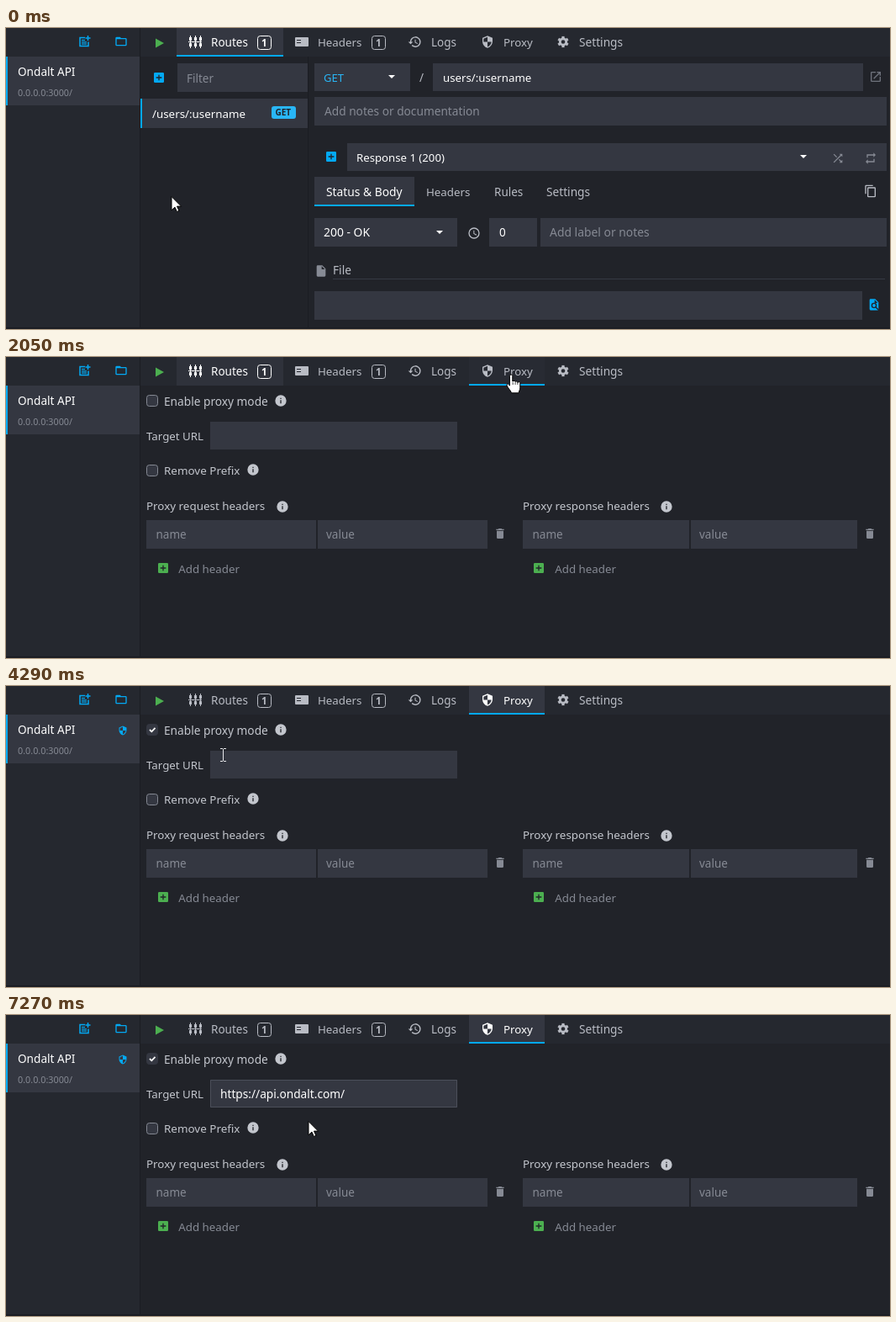
An HTML page with a canvas for the animation above (7370 ms loop, 1052x358 px).

```html
<!DOCTYPE html>
<html lang="en">
<head>
<meta charset="utf-8">
<title>Proxy mode setup</title>
<style>
  html, body { margin: 0; width: 100%; height: 100%; overflow: hidden; background: #212329; }
  canvas { display: block; width: 1052px; height: 358px; }
</style>
</head>
<body>
<canvas id="stage"></canvas>
<script>
const W = 1052, H = 358, LOOP = 7370;
const canvas = document.getElementById('stage');
const ctx = canvas.getContext('2d');
const dpr = window.devicePixelRatio || 1;
canvas.width = W * dpr;
canvas.height = H * dpr;

const C = {
  page: '#212329', side: '#25282f', field: '#343741', edge: '#1b1d23',
  blue: '#03a9f4', green: '#4caf50', white: '#ffffff',
  text: '#b9bcc4', label: '#c3c6cd', hint: '#868a94', dim: '#6f737d'
};

// Icons on a 24 unit grid
const ICONS = {
  shield: 'M12 1L3 5v6c0 5.55 3.84 10.74 9 12 5.16-1.26 9-6.45 9-12V5zm0 10.99h7c-.53 4.12-3.28 7.79-7 8.94V12H5V6.3l7-3.11z',
  history: 'M13 3a9 9 0 0 0-9 9H1l4 4 4-4H6a7 7 0 1 1 2.06 4.94l-1.42 1.42A9 9 0 1 0 13 3zm-1 5v5l4.28 2.54.72-1.21-3.5-2.08V8z',
  trash: 'M6 19a2 2 0 0 0 2 2h8a2 2 0 0 0 2-2V7H6zM19 4h-3.5l-1-1h-5l-1 1H5v2h14z',
  info: 'M12 2a10 10 0 1 0 0 20a10 10 0 1 0 0-20zm1 15h-2v-6h2zm0-8h-2V7h2z',
  add: 'M19 3H5a2 2 0 0 0-2 2v14a2 2 0 0 0 2 2h14a2 2 0 0 0 2-2V5a2 2 0 0 0-2-2zm-2 10h-4v4h-2v-4H7v-2h4V7h2v4h4z',
  folder: 'M20 6h-8l-2-2H4a2 2 0 0 0-2 2v12a2 2 0 0 0 2 2h16a2 2 0 0 0 2-2V8a2 2 0 0 0-2-2zm0 12H4V8h16z',
  file: 'M6 2a2 2 0 0 0-2 2v16a2 2 0 0 0 2 2h12a2 2 0 0 0 2-2V8l-6-6zm7 7V3.5L18.5 9z',
  copy: 'M16 1H4a2 2 0 0 0-2 2v14h2V3h12zm3 4H8a2 2 0 0 0-2 2v14a2 2 0 0 0 2 2h11a2 2 0 0 0 2-2V7a2 2 0 0 0-2-2zm0 16H8V7h11z',
  repeat: 'M7 7h10v3l4-4-4-4v3H5v6h2zm10 10H7v-3l-4 4 4 4v-3h12v-6h-2z',
  shuffle: 'M10.6 9.2L5.4 4 4 5.4l5.2 5.2zM14.5 4l2 2L4 18.6 5.4 20 18 7.5l2 2V4zm.3 9.4l-1.4 1.4 3.1 3.1-2 2.1H20v-5.5l-2 2z',
  open: 'M19 19H5V5h7V3H5a2 2 0 0 0-2 2v14a2 2 0 0 0 2 2h14a2 2 0 0 0 2-2v-7h-2zM14 3v2h3.6l-9.8 9.8 1.4 1.4L19 6.4V10h2V3z',
  clock: 'M12 2a10 10 0 1 0 0 20a10 10 0 1 0 0-20zm0 2a8 8 0 1 1 0 16a8 8 0 1 1 0-16zM11 7v6l5 3 .8-1.3-4.3-2.5V7z'
};
for (const k in ICONS) ICONS[k] = new Path2D(ICONS[k]);

const ARROW = new Path2D('M0 .5V16.8l3.9-3.7 2.5 5.4 2.6-1.1-2.5-5.3h5z');
const HAND = new Path2D('M-1.6 1.6a1.7 1.7 0 0 1 3.4 0V8l1.1-.5a1.6 1.6 0 0 1 2.2 1 1.6 1.6 0 0 1 2.8 1A1.6 1.6 0 0 1 10.8 11v4.8c0 2.2-1.3 3.2-1.6 6H.5c-.4-2.4-3.4-4.7-5.4-8.8-.8-1.9 1.3-2.5 2.2-1.3l1.1 1.4z');

function rect(x, y, x2, y2, color) {
  ctx.fillStyle = color;
  ctx.fillRect(x, y, x2 - x, y2 - y);
}

function field(x, y, x2, y2) { rect(x, y, x2, y2, C.field); }

function text(str, x, y, color = C.text, size = 13.5, weight = 400) {
  ctx.font = `${weight} ${size}px "Noto Sans", "Open Sans", sans-serif`;
  ctx.fillStyle = color;
  ctx.fillText(str, x, y);
}

function icon(name, cx, cy, size, color) {
  ctx.save();
  ctx.translate(cx - size / 2, cy - size / 2);
  ctx.scale(size / 24, size / 24);
  ctx.fillStyle = color;
  ctx.fill(ICONS[name], 'evenodd');
  ctx.restore();
}

function line(color, width, ...pts) {
  ctx.beginPath();
  for (let i = 0; i < pts.length; i += 2) ctx.lineTo(pts[i], pts[i + 1]);
  ctx.strokeStyle = color;
  ctx.lineWidth = width;
  ctx.stroke();
}

function shape(color, ...pts) {
  ctx.beginPath();
  for (let i = 0; i < pts.length; i += 2) ctx.lineTo(pts[i], pts[i + 1]);
  ctx.fillStyle = color;
  ctx.fill();
}

function box(x, y, w, h, r, stroke, fill) {
  ctx.beginPath();
  ctx.roundRect(x, y, w, h, r);
  if (fill) { ctx.fillStyle = fill; ctx.fill(); }
  if (stroke) { ctx.strokeStyle = stroke; ctx.lineWidth = 1; ctx.stroke(); }
}

function dropdown(cx, cy) { shape(C.white, cx - 4, cy - 2, cx + 4, cy - 2, cx, cy + 2); }

function badge(x, color) {
  box(x + .5, 9.5, 16, 16, 3, color);
  text('1', x + 5, 22, color, 11.5, 700);
}

function gear(cx, cy, color) {
  ctx.strokeStyle = color;
  ctx.lineWidth = 2.8;
  ctx.beginPath();
  ctx.arc(cx, cy, 3.7, 0, 7);
  ctx.stroke();
  for (let i = 0; i < 6; i++) {
    const a = i * Math.PI / 3 + Math.PI / 6, c = Math.cos(a), s = Math.sin(a);
    line(color, 3.2, cx + c * 4, cy + s * 4, cx + c * 6.6, cy + s * 6.6);
  }
}

function sidebar(proxied) {
  rect(0, 0, 159, H, C.side);
  field(0, 34, 159, 92);
  rect(0, 34, 2, 92, C.blue);
  rect(159, 0, 160, H, C.edge);
  line(C.blue, 1.5, 94, 11.5, 88, 11.5, 88, 21.5, 98, 21.5, 98, 16.5);
  for (const y of [14.5, 16.8, 19]) line(C.blue, 1.2, 90, y, y < 15 ? 94 : 96, y);
  line(C.blue, 1.5, 97.5, 9, 97.5, 15);
  line(C.blue, 1.5, 94.5, 12, 100.5, 12);
  icon('folder', 137, 16, 16, C.blue);
  text('Ondalt API', 14, 57, C.white, 13.6);
  text('0.0.0.0:3000/', 14, 81, C.hint, 10.8);
  if (proxied) icon('shield', 139, 53, 12, C.blue);
}

// mix: 0 = routes tab active, 1 = proxy tab active
function tabBar(mix) {
  rect(160, 0, W, 34, C.side);
  shape(C.green, 178, 12.5, 188, 18, 178, 23.5);
  const routes = mix < 1 ? C.white : C.text;
  const proxy = mix === 1 ? C.white : C.text;
  ctx.globalAlpha = mix === .5 ? .7 : 1 - mix;
  field(203, 0, 330, 34);
  ctx.globalAlpha = mix === .5 ? .2 : mix;
  field(551, 0, 641, 34);
  ctx.globalAlpha = 1;
  if (mix) rect(551, 32, 641, 34, C.blue);
  else rect(203, 32, 330, 34, C.blue);

  for (const x of [218, 224, 230]) {
    rect(x, 11, x + 3, 15, routes);
    rect(x, 18, x + 3, 22, routes);
    rect(x + 1, 9, x + 2, 24, routes);
  }
  rect(217, 16, 233, 17, routes);
  text('Routes', 244, 22, routes);
  badge(299, routes);

  box(344, 11, 16, 11, 1, null, C.text);
  rect(346, 14, 351, 15, C.side);
  rect(346, 17, 351, 18, C.side);
  text('Headers', 371, 22, C.text, 13.3);
  badge(435, C.text);
  icon('history', 486.5, 16.5, 17, C.text);
  text('Logs', 506, 22);
  icon('shield', 573, 16.5, 16, proxy);
  text('Proxy', 592, 22, proxy, 13.3);
  gear(663, 16.5, C.text);
  text('Settings', 682, 22, C.text, 13.7);
}

function routesPage() {
  rect(359, 34, 360, H, C.edge);
  icon('add', 182, 59, 16, C.blue);
  field(204, 42, 359, 76);
  text('Filter', 215, 65, C.hint);
  field(160, 84, 359, 119);
  rect(160, 84, 162, 119, C.blue);
  text('/users/:username', 174, 107, C.white, 13.35);
  box(316, 93, 29, 15, 3, null, '#29b6f6');
  text('GET', 320.5, 104, '#20232a', 10, 600);

  field(367, 42, 481, 75);
  text('GET', 378, 64, '#29b6f6', 13);
  dropdown(459, 58);
  text('/', 492, 64);
  field(508, 42, 1020, 75);
  text('users/:username', 520, 64, C.white, 13.25);
  icon('open', 1035, 58, 16, C.dim);
  field(367, 82, 1048, 116);
  text('Add notes or documentation', 379, 104, C.hint, 13.7);

  icon('add', 387, 153, 16, C.blue);
  field(406, 137, 1048, 170);
  text('Response 1 (200)', 417, 159, C.white, 13.2);
  dropdown(949, 153);
  icon('shuffle', 990, 155, 16, C.hint);
  icon('repeat', 1029, 155, 16, C.hint);

  field(367, 177, 486, 212);
  rect(367, 210, 486, 212, C.blue);
  text('Status & Body', 381, 200, C.white, 13.8);
  text('Headers', 500, 200, C.text, 13.3);
  text('Rules', 581, 200);
  text('Settings', 643, 200, C.text, 13.7);
  icon('copy', 1029, 194, 16, C.text);

  field(367, 226, 537, 260);
  text('200 - OK', 378, 248, C.white, 13.9);
  dropdown(516, 243);
  icon('clock', 557, 244, 16, C.text);
  field(575, 226, 632, 260);
  text('0', 587, 248, C.white);
  field(636, 226, 1048, 260);
  text('Add label or notes', 647, 248, C.hint, 13.9);

  icon('file', 375, 289, 16, C.hint);
  text('File', 389, 293, C.text, 13.7);
  rect(389, 298, 1046, 299, '#363a43');
  field(367, 313, 1019, 347);
  icon('file', 1033, 329, 16, C.blue);
  ctx.beginPath();
  ctx.arc(1033, 330, 2.6, 0, 7);
  ctx.strokeStyle = C.page;
  ctx.lineWidth = 1.4;
  ctx.stroke();
  line(C.page, 1.4, 1035, 332, 1038, 335);
}

function checkbox(y, checked) {
  box(167.5, y + .5, 13, 13, 3, checked ? C.field : '#858993', C.field);
  if (checked) line(C.white, 1.8, 171, y + 7, 173.3, y + 9.3, 177.5, y + 4.8);
}

function headerTable(x, x2, width, addX) {
  field(x, 194, x + width, 228);
  field(x + width + 2, 194, x2, 228);
  text('name', x + 11.5, 216, C.hint);
  text('value', x + width + 12, 216, C.hint);
  icon('trash', x2 + 15, 210, 16, C.hint);
  icon('add', addX, 251, 16, C.green);
  text('Add header', x + 38.3, 257, C.hint, 13.3);
}

function proxyPage(t) {
  checkbox(45, t >= 3380);
  text('Enable proxy mode', 188, 58, C.label, 13.7);
  icon('info', 327, 52, 16, C.label);
  text('Target URL', 167, 99, C.label, 13.3);
  field(243, 77, 537, 110);
  checkbox(128, false);
  text('Remove Prefix', 188, 140, C.label, 13.45);
  icon('info', 294, 134, 16, C.label);
  text('Proxy request headers', 167, 182, C.label, 13.4);
  icon('info', 329, 178, 16, C.label);
  text('Proxy response headers', 615, 182, C.label, 13.4);
  icon('info', 786, 178, 16, C.label);
  headerTable(167, 573, 202, 187);
  headerTable(615, 1013, 198, 634);

  if (t < 4750) return;
  box(243.5, 77.5, 293, 32, 0, '#4b4f5a');
  let caret = 255;
  if (t >= 5620) {
    const url = 'https://api.ondalt.com/';
    text(url, caret, 99, C.white, 13.7);
    caret = Math.round(255 + ctx.measureText(url).width);
  }
  const on = t < 5200 || (t >= 5620 && t < 6180) || (t >= 6740 && t < 7270);
  if (on) rect(caret, 84, caret + 1, 103, C.white);
}

// Pointer path: time, x, y
const PATH = [
  [530, 197, 200], [770, 250, 178], [1090, 430, 118], [1330, 511, 95],
  [1349, 511, 95], [1600, 556, 58], [1850, 595, 26], [1990, 601, 21],
  [2120, 601, 21], [2350, 505, 38], [2610, 300, 63], [2750, 240, 65], [2890, 218, 59],
  [2980, 200, 55], [3210, 168, 51],
  [3460, 168, 51], [3800, 188, 60], [4060, 205, 68],
  [4290, 260, 82], [4610, 291, 95],
  [4990, 291, 95], [5200, 317, 106], [5440, 360, 126]
];
// The pointer is sampled in bursts: start, end, count
const BURSTS = [
  [610, 1330, 10], [1420, 1990, 9], [2190, 2890, 11], [2980, 3210, 4],
  [3380, 4060, 9], [4120, 4610, 7], [5060, 5200, 2], [5200, 5440, 5]
];

function sampleTime(t) {
  let out = 0;
  for (const [start, end, count] of BURSTS) {
    if (t < start) break;
    const step = (end - start) / (count - 1);
    out = start + Math.min(count - 1, Math.floor((t - start) / step + 1e-3)) * step;
  }
  return out;
}

function pointerAt(t) {
  const s = sampleTime(t);
  const i = PATH.findIndex(p => p[0] > s);
  if (i === 0) return PATH[0].slice(1);
  if (i < 0) return PATH[PATH.length - 1].slice(1);
  const [t0, x0, y0] = PATH[i - 1], [t1, x1, y1] = PATH[i];
  const k = (s - t0) / (t1 - t0);
  return [Math.round(x0 + (x1 - x0) * k), Math.round(y0 + (y1 - y0) * k)];
}

function pointer(t) {
  const [x, y] = pointerAt(t);
  const inside = (a, b, c, d) => x >= a && y >= b && x <= c && y <= d;
  const typing = t < 2050
    ? inside(367, 82, 1048, 116) || inside(508, 42, 1020, 75)
    : inside(243, 77, 537, 110);
  ctx.save();
  ctx.translate(x, y);
  if (typing) {
    line('#e6e7ea', 1, .5, -7, .5, 7);
    for (const e of [-7.5, 7.5]) {
      line('#e6e7ea', 1, -3, e, 0, e);
      line('#e6e7ea', 1, 1, e, 4, e);
    }
  } else {
    const form = y < 34 ? HAND : ARROW;
    ctx.fillStyle = C.white;
    ctx.strokeStyle = '#000';
    ctx.lineWidth = 1;
    ctx.fill(form);
    ctx.stroke(form);
    if (form === HAND) for (const lx of [2.2, 5.1, 7.9]) line('#000', .7, lx, 9, lx, 12);
  }
  ctx.restore();
}

function draw(t) {
  ctx.setTransform(dpr, 0, 0, dpr, 0, 0);
  rect(0, 0, W, H, C.page);
  sidebar(t >= 3380);
  tabBar(t < 2050 ? 0 : t < 2110 ? .5 : 1);
  if (t < 2050) routesPage();
  else proxyPage(t);
  rect(0, 356, W, H, C.edge);
  pointer(t);
}

function frame() {
  draw(performance.now() % LOOP);
  requestAnimationFrame(frame);
}
frame();
</script>
</body>
</html>
```
